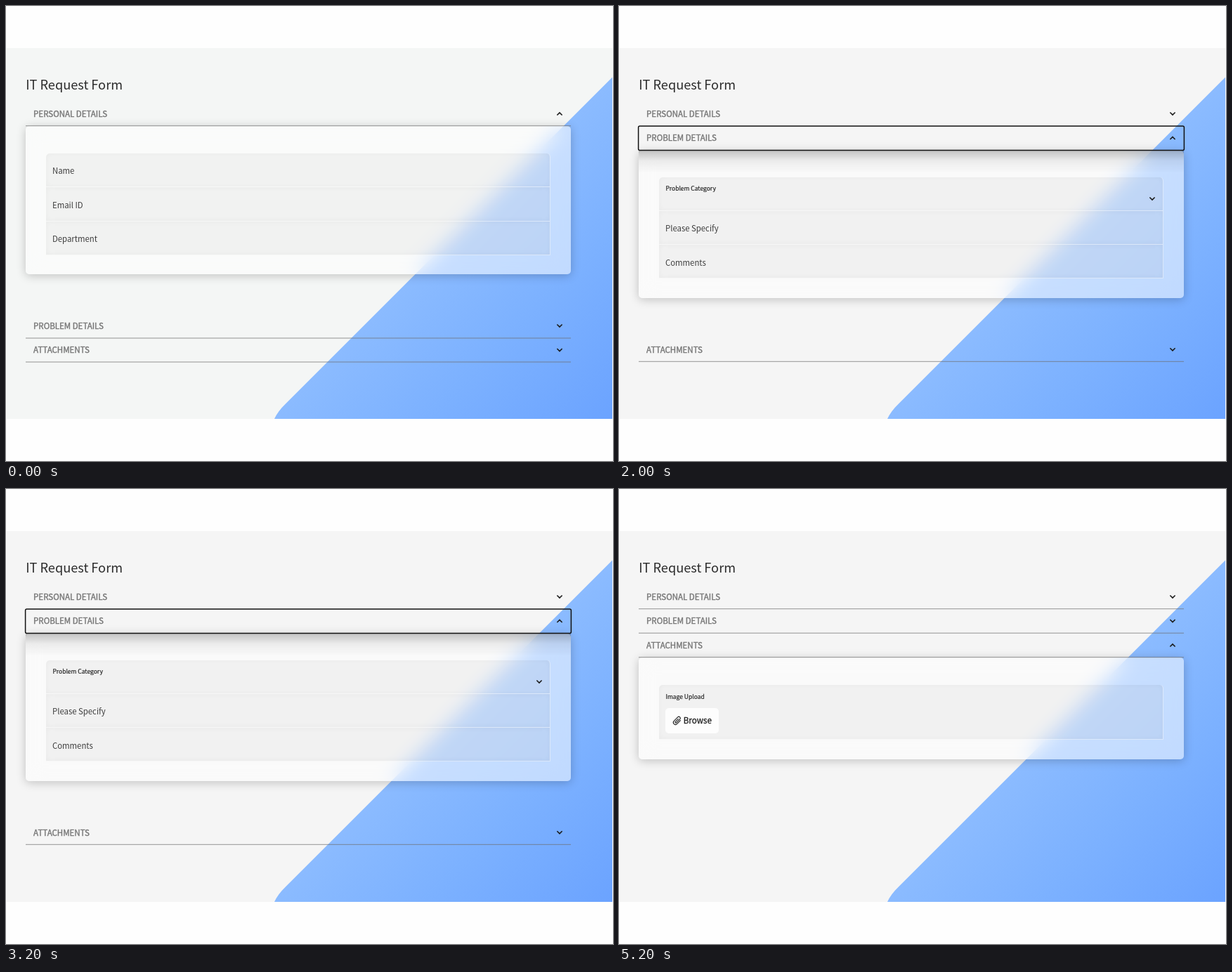
Recreate the animation shown at these times as an HTML page. Size 864 by 648 pixels, loop 6000 ms.

```html
<!DOCTYPE html>
<html lang="en">
<head>
<meta charset="utf-8">
<title>IT Request Form</title>
<style>
html, body { margin: 0; width: 100%; height: 100%; overflow: hidden; background: #fefefe; }
#stage { position: relative; width: 864px; height: 648px; overflow: hidden; }
svg, .scene, .scene div { position: absolute; box-sizing: border-box; }
svg, .scene { left: 0; top: 0; width: 864px; height: 648px; }
.scene { display: none; }
.scene.on { display: block; }
.panel {
  left: 28px; width: 776px; border-radius: 5px;
  background: rgba(255, 255, 255, .53);
  backdrop-filter: blur(14px);
  box-shadow: 0 2px 14px rgba(0, 0, 0, .22);
}
.field {
  left: 57px; width: 718px;
  background: rgba(0, 0, 0, .035);
  border: solid rgba(255, 255, 255, .45); border-width: 0 1px 1px 0;
  box-shadow: inset 0 0 8px rgba(0, 0, 0, .045);
}
.field.first { border-radius: 5px 5px 0 0; }
.shade { left: 28px; width: 776px; background: linear-gradient(rgba(0, 0, 0, .22), rgba(0, 0, 0, .06) 45%, transparent); }
.button { background: #fdfdfd; border-radius: 5px; }
text { font-family: "Noto Sans CJK JP", "Noto Sans CJK SC", "Noto Sans CJK", "Noto Sans", sans-serif; white-space: pre; }
.title { font-size: 18.2px; fill: #2b2b2b; }
.head { font-size: 11.5px; fill: #777; stroke: #777; stroke-width: .4px; }
.label { font-size: 11.35px; fill: #3d3d3d; }
.small { font-size: 8.5px; fill: #222; stroke: #222; stroke-width: .2px; }
.action { font-size: 11.6px; fill: #222; stroke: #222; stroke-width: .3px; }
.rule { fill: none; stroke: rgba(110, 110, 110, .72); }
.focus { fill: none; stroke: #111; stroke-width: 1.5; }
.chevron { fill: none; stroke: #1a1a1a; stroke-width: 1.6; }
.clip { fill: none; stroke: #222; stroke-width: 1.1; stroke-linecap: round; }
</style>
</head>
<body>
<div id="stage">
  <svg viewBox="0 0 864 648">
    <defs>
      <linearGradient id="blue" gradientUnits="userSpaceOnUse" x1="620" y1="345" x2="863" y2="588">
        <stop offset="0" stop-color="#8bbbff"/>
        <stop offset=".45" stop-color="#7cb1ff"/>
        <stop offset="1" stop-color="#6ba3ff"/>
      </linearGradient>
    </defs>
    <rect id="page" x="1" y="60" width="862" height="528"/>
    <path fill="url(#blue)" d="M863 101.5L398 566.5Q387 577 382 588H863Z"/>
  </svg>
</div>
<script>
const STEP = 2000;
const stage = document.getElementById('stage');
const page = document.getElementById('page');

const box = (cls, top, bottom, extra = '') =>
  `<div class="${cls}" style="top:${top}px;height:${bottom - top}px;${extra}"></div>`;
const text = (cls, x, y, s) => `<text class="${cls}" x="${x}" y="${y}">${s}</text>`;
const rule = y => `<path class="rule" d="M28 ${y}H804"/>`;
const chevron = (x, y, up) => {
  const d = up ? -2 : 2;
  return `<path class="chevron" d="M${x - 3.6} ${y - d}L${x} ${y + d * .8}L${x + 3.6} ${y - d}"/>`;
};
const header = (name, y, up) => text('head', 39.1, y + 4.4, name) + chevron(788, y, up);
const fields = edges => edges.slice(1)
  .map((b, i) => box(i ? 'field' : 'field first', edges[i], b)).join('');
const labels = list => list.map(([s, y]) => text('label', 66, y, s)).join('');

const scenes = [
  {
    page: '#f4f6f5',
    boxes: box('panel', 171, 382) + fields([209.5, 257.5, 306.5, 354.5]),
    art: header('PERSONAL DETAILS', 153.5, true) + rule(170.7)
      + labels([['Name', 239], ['Email ID', 287.5], ['Department', 335.8]])
      + header('PROBLEM DETAILS', 455.5) + rule(473)
      + header('ATTACHMENTS', 490) + rule(507)
  },
  {
    page: '#f5f5f5',
    boxes: box('panel', 206, 415.5) + box('shade', 206, 238)
      + fields([243.5, 291.5, 340, 388]),
    art: header('PERSONAL DETAILS', 153.5) + header('PROBLEM DETAILS', 188, true)
      + '<rect class="focus" x="27.6" y="171" width="776.8" height="34.6" rx="2"/>'
      + text('small', 66.4, 263.2, 'Problem Category') + chevron(759, 274.5)
      + labels([['Please Specify', 321], ['Comments', 369.7]])
      + header('ATTACHMENTS', 489.3) + rule(506.3)
  },
  {
    page: '#f5f5f5',
    boxes: box('panel', 240, 385) + fields([278.5, 356.5])
      + box('button', 312, 347.5, 'left:66px;width:76px'),
    art: header('PERSONAL DETAILS', 153.5) + rule(170.7)
      + header('PROBLEM DETAILS', 188) + rule(205.2)
      + header('ATTACHMENTS', 222.5, true) + rule(239.7)
      + text('small', 66.4, 298.8, 'Image Upload')
      + text('action', 91.7, 334.2, 'Browse')
      + '<path class="clip" transform="translate(82.8 330) rotate(45)" '
      + 'd="M3-3.6V3.4a3 3 0 0 1-6 0V-4.2a2.1 2.1 0 0 1 4.2 0V2.8a1 1 0 0 1-2 0V-3"/>'
  }
];

const nodes = scenes.map(({ boxes, art }) => {
  const el = document.createElement('div');
  el.className = 'scene';
  el.innerHTML = boxes + `<svg viewBox="0 0 864 648">${text('title', 28.2, 119.2, 'IT Request Form')}${art}</svg>`;
  return stage.appendChild(el);
});

let shown = -1;
const start = performance.now();
function draw() {
  const now = Math.floor((performance.now() - start) / STEP) % scenes.length;
  if (now !== shown) {
    shown = now;
    page.setAttribute('fill', scenes[now].page);
    nodes.forEach((el, i) => el.classList.toggle('on', i === now));
  }
  requestAnimationFrame(draw);
}
draw();
</script>
</body>
</html>
```
